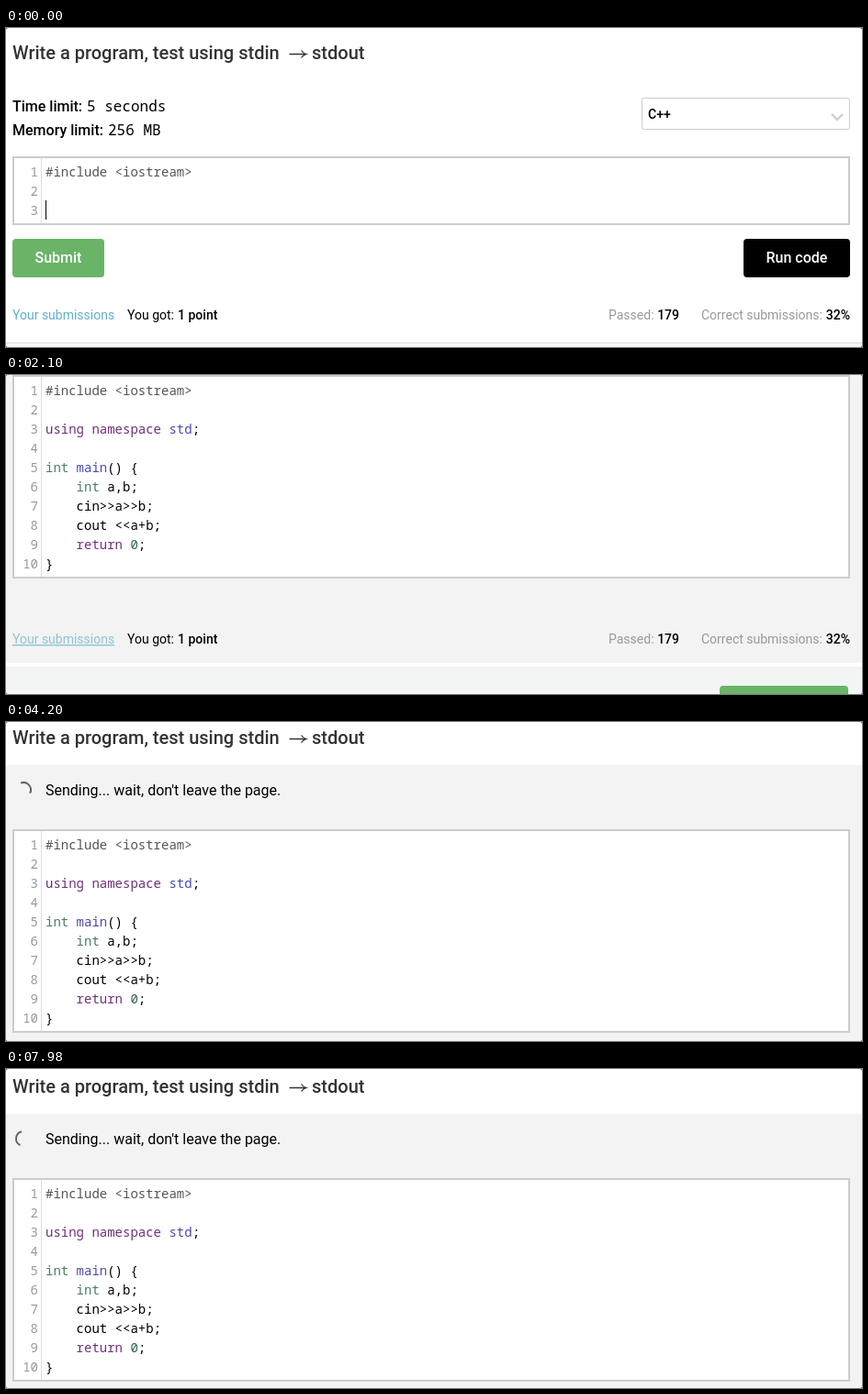
Write an HTML page that moves like this. It is 932x348 px and loops after 8000 ms.

```html
<!DOCTYPE html>
<html lang="en">
<head>
<meta charset="utf-8">
<title>Submitting a program</title>
<style>
html, body { margin: 0; width: 100%; height: 100%; overflow: hidden; background: #777; }
svg { display: block; width: 932px; height: 348px; background: #fff; border-radius: 3px; }
text { font: 14px Roboto, sans-serif; white-space: pre; }
.big { font-size: 16px; }
.strong { font-weight: 500; }
.title { font-size: 20px; font-weight: 500; fill: #333; }
.code, .code text { font-family: "Roboto Mono", "Noto Sans Mono", monospace; }
.dim { fill: #999; }
.inc { fill: #555; }
.kw { fill: #70307a; }
.def { fill: #4a4ab2; }
.type { fill: #4a7c6a; }
.num { fill: #2f6050; }
.link { fill: #5eb0d0; }
.hover .link { fill: #8cc3d8; text-decoration: underline; }
</style>
</head>
<body>
<svg viewBox="0 0 932 348">
  <defs>
    <g id="status">
      <text x="132" y="318">You got:</text>
      <text x="187" y="318" class="strong">1 point</text>
      <text x="656" y="318" class="dim">Passed:</text>
      <text x="733" y="318" class="strong" text-anchor="end">179</text>
      <text x="757" y="318" class="dim">Correct submissions:</text>
      <text x="919" y="318" class="strong" text-anchor="end">32%</text>
    </g>
  </defs>
  <g id="page">
    <text x="7" y="34" class="title">Write a program, test using stdin</text>
    <path d="M308.500 28.500H327M321.500 24.500Q323.500 27.500 327 28.500Q323.500 29.500 321.500 32.500" fill="none" stroke="#333" stroke-width="1.300"/>
    <text x="333" y="34" class="title">stdout</text>

    <g id="form">
      <text x="7" y="91" class="big strong">Time limit:</text>
      <text x="88" y="91" class="big code">5 seconds</text>
      <text x="7" y="117" class="big strong">Memory limit:</text>
      <text x="111" y="117" class="big code">256 MB</text>
      <rect x="692.500" y="76.500" width="226" height="34" rx="2" fill="#fff" stroke="#ccc"/>
      <text x="699" y="99" class="strong">C++</text>
      <path d="M899 94l6 6l6-6" fill="none" stroke="#ccc" stroke-width="2"/>
      <g id="below">
        <rect x="7" y="230" width="100" height="42" rx="4" fill="#6ab468"/>
        <text x="57" y="256" class="big strong" fill="#fff" text-anchor="middle">Submit</text>
        <rect x="803" y="230" width="116" height="42" rx="4"/>
        <text x="861" y="256" class="big strong" fill="#fff" text-anchor="middle">Run code</text>
        <text x="7" y="318" class="link">Your submissions</text>
        <use href="#status"/>
        <rect y="343" width="932" height="100" fill="#f7f7f7"/>
        <rect y="343" width="932" height="1" fill="#ddd"/>
      </g>
    </g>

    <g id="sending">
      <rect y="57" width="932" height="384" fill="#f3f3f3"/>
      <rect y="445" width="932" height="120" fill="#f3f4f4"/>
      <path id="spinner" fill="none" stroke="#666" stroke-width="2"/>
      <text x="43" y="90" class="big">Sending... wait, don't leave the page.</text>
      <g class="hover" transform="translate(0 102)">
        <text x="7" y="318" class="link">Your submissions</text>
        <use href="#status"/>
      </g>
      <rect x="777" y="466" width="140" height="42" rx="4" fill="#6ab468"/>
    </g>

    <g id="editor" class="code">
      <rect id="box" x="8" y="1" width="910" fill="#fff" stroke="#ccc" stroke-width="2"/>
      <rect id="gutter" x="38" y="2" width="1" fill="#ddd"/>
      <g id="lines"></g>
      <rect id="caret" width="1" height="21"/>
    </g>
  </g>
</svg>
<script>
const LOOP = 8000, STEP = 70, PASTE = 210, SENT = 1890, SCROLL_UP = 2917;
const $ = id => document.getElementById(id);
const set = (id, attrs) => { for (const k in attrs) $(id).setAttribute(k, attrs[k]); };
const show = (id, on) => set(id, { display: on ? "inline" : "none" });
const move = (id, y) => set(id, { transform: `translate(0 ${y})` });

// Each token is written as class{text}.
const program = `inc{#include <iostream>}

kw{using} kw{namespace} def{std};

type{int} def{main}() {
    type{int} a,b;
    cin>>a>>b;
    cout <<a+b;
    kw{return} num{0};
}`.split("\n");

const escapeHtml = s => s.replace(/</g, "&lt;").replace(/>/g, "&gt;");
const colour = s => escapeHtml(s).replace(/(\w+)\{([^}]*)\}/g, '<tspan class="$1">$2</tspan>');
$("lines").innerHTML = program.map((line, i) => {
  const y = 22 + 21 * i;
  return `<g><text x="35" y="${y}" text-anchor="end" class="dim">${i + 1}</text>` +
    `<text x="43" y="${y}">${colour(line)}</text></g>`;
}).join("");
const rows = [...$("lines").children];

function scrollAt(t) {
  if (t < 1050) return 0;
  if (t < SCROLL_UP) return Math.round(127 * (1 - Math.exp((1000 - t) / 184)));
  return Math.round(8 + 119 * Math.exp((SCROLL_UP - t) / 314));
}

function spinnerArc(t) {
  const mid = 27 + 360 * (t - 3360) / 1040;
  const point = deg => {
    const a = deg * Math.PI / 180;
    return `${19 + 8 * Math.cos(a)} ${84 + 8 * Math.sin(a)}`;
  };
  return `M${point(mid - 70)}A8 8 0 0 1 ${point(mid + 70)}`;
}

function draw(t) {
  const pasted = t >= PASTE, sent = t >= SENT;
  const count = pasted ? 10 : 3;
  move("page", -scrollAt(t));
  show("form", !sent);
  show("sending", sent);
  move("below", pasted ? 147 : 0);
  move("editor", sent ? 127 : 140);
  set("box", { height: count * 21 + 10 });
  set("gutter", { height: count * 21 + 8 });
  rows.forEach((row, i) => {
    row.style.display = i < count ? "" : "none";
    row.lastChild.style.display = pasted || i === 0 ? "" : "none";
  });
  show("caret", t < 840 || (t >= 1370 && !sent));
  set("caret", { x: pasted ? 51 : 43, y: 6 + 21 * (count - 1) });
  set("spinner", { d: spinnerArc(t) });
}

function tick() {
  const t = performance.now() % LOOP;
  draw(Math.floor(t / STEP) * STEP);
  requestAnimationFrame(tick);
}
tick();
</script>
</body>
</html>
```
